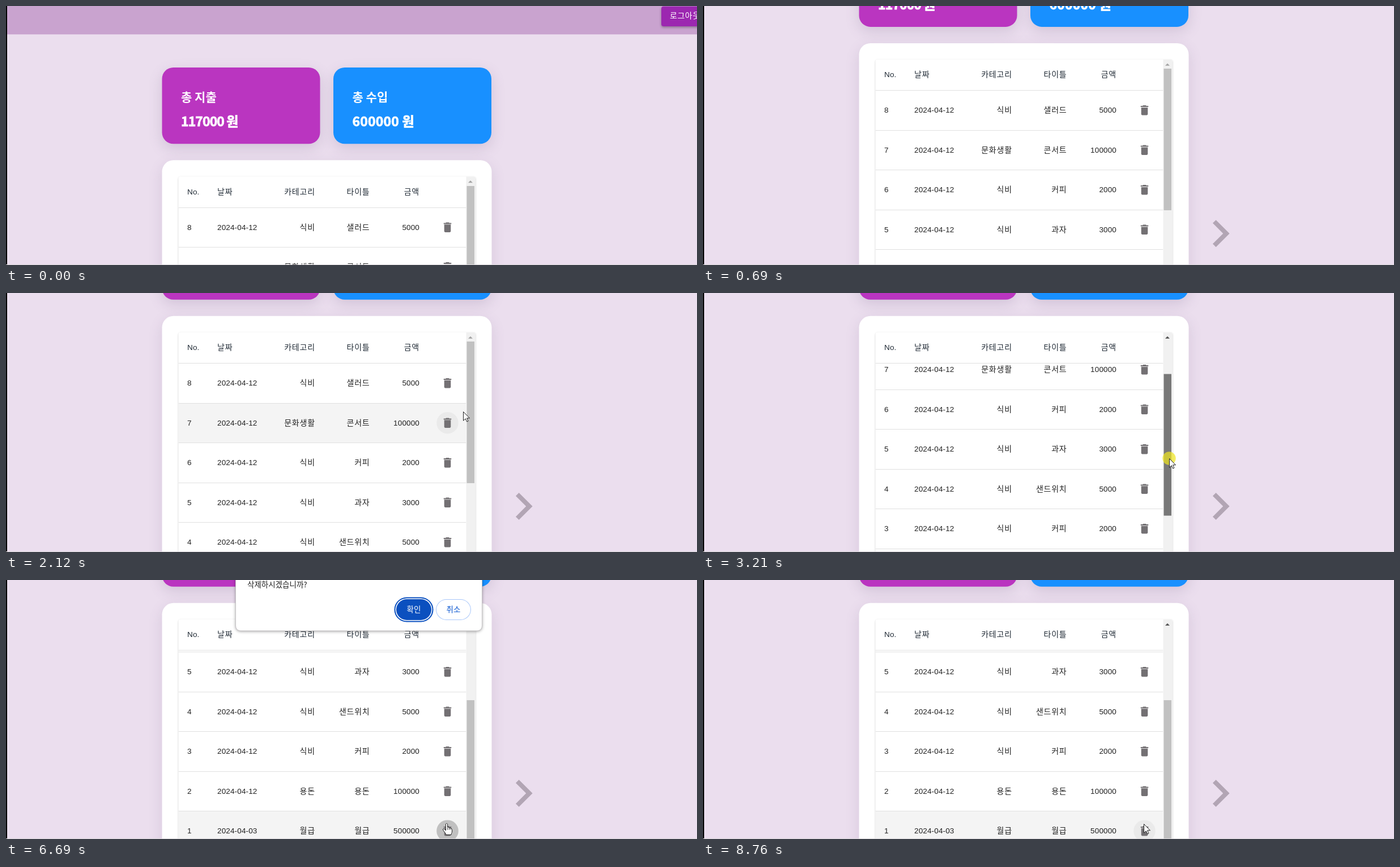
Write an HTML page with a canvas that moves like this. It is 1220 px wide and 459 px high and loops after 8970 ms.

```html
<!DOCTYPE html>
<html lang="ko">
<head>
<meta charset="utf-8">
<style>
html, body { margin: 0; width: 100%; height: 100%; overflow: hidden; background: #ebdeee; }
canvas { display: block; }
</style>
</head>
<body>
<canvas id="stage" width="1220" height="459"></canvas>
<script>
const W = 1220, H = 459, LOOP = 8970;
const ctx = document.getElementById('stage').getContext('2d');

const LATIN = "'Liberation Sans', Arial, sans-serif";
const HANGUL = "'Noto Sans CJK KR', 'Noto Sans CJK', sans-serif";
const UI = 0.966;                 // page zoom applied to icons
const ROW = 70.5, HEAD_Y = 357.2; // row pitch, bottom of the table header
const BUTTON_X = 779.5, BUTTON_R = 19.3;

const trash = new Path2D('M6 19c0 1.1.9 2 2 2h8c1.1 0 2-.9 2-2V7H6v12zM19 4h-3.5l-1-1h-5l-1 1H5v2h14V4z');
const chevron = new Path2D('M10 6L8.59 7.41 13.17 12l-4.58 4.59L10 18l6-6z');
const arrowCursor = new Path2D('M.5 .5V16.2L4.2 12.8L6.7 18L9 17L6.6 11.8H11.5Z');
const handCursor = new Path2D('M-1.6 1C-1.6-1 1.6-1 1.6 1V6.4C3 5.9 4.2 6.4 4.6 7.3C6 6.9 7 7.4 7.3 8.4C8.6 8.1 9.5 9 9.5 10.4V14C9.5 16 8 17 8 19.5H-1C-1 17.5-5 13.5-6.3 11C-7.2 9-5 8.2-3.6 9.8L-1.6 12Z');

const columns = [['No.', 320, 'left'], ['날짜', 373, 'left'], ['카테고리', 545.8, 'right'],
  ['타이틀', 642.5, 'right'], ['금액', 730, 'right']];
const rows = [
  ['8', '2024-04-12', '식비', '샐러드', '5000'],
  ['7', '2024-04-12', '문화생활', '콘서트', '100000'],
  ['6', '2024-04-12', '식비', '커피', '2000'],
  ['5', '2024-04-12', '식비', '과자', '3000'],
  ['4', '2024-04-12', '식비', '샌드위치', '5000'],
  ['3', '2024-04-12', '식비', '커피', '2000'],
  ['2', '2024-04-12', '용돈', '용돈', '100000'],
  ['1', '2024-04-03', '월급', '월급', '500000']
];

// Bursts of movement: first step, last step, number of steps.
const bursts = [[280, 690, 7], [762, 980, 4], [1390, 2120, 11], [2210, 2210, 1], [2290, 2370, 2],
  [2520, 2520, 1], [2730, 2730, 1], [2870, 3210, 6], [3280, 3700, 6], [3770, 4010, 4],
  [4360, 4660, 5], [5000, 5000, 1], [5220, 5710, 7], [6690, 6950, 4], [7990, 8130, 3], [8550, 8760, 4]];

// Cursor path: time, x, y.
const path = [[1390, 1119, 300], [1600, 960, 262], [1830, 781, 236], [1980, 779, 228], [2120, 807, 210],
  [2210, 810, 209], [2290, 813, 209], [2800, 813, 210], [3210, 823, 293], [3700, 823, 396],
  [4290, 823, 396], [4660, 778, 432]];
const scrollKeys = [[2800, 0], [3210, 94.5], [3700, 208.5]];

function hold(t) {
  let held = 0;
  for (const [a, b, n] of bursts) {
    if (t < a) break;
    const d = n > 1 ? (b - a) / (n - 1) : 1;
    held = Math.min(b, a + Math.floor((t - a) / d + 1e-6) * d);
  }
  return held;
}

function ramp(t, a, b) {
  return Math.max(0, Math.min(1, (t - a) / (b - a)));
}

function track(keys, t, k) {
  if (t <= keys[0][0]) return keys[0][k];
  for (let i = 1; i < keys.length; i++) {
    const p = keys[i - 1], q = keys[i];
    if (t <= q[0]) return p[k] + (q[k] - p[k]) * ramp(t, p[0], q[0]);
  }
  return keys[keys.length - 1][k];
}

function rect(x, y, w, h, color) {
  ctx.fillStyle = color;
  ctx.fillRect(x, y, w, h);
}

function box(x, y, w, h, r, color) {
  ctx.beginPath();
  ctx.roundRect(x, y, w, h, r);
  ctx.fillStyle = color;
  ctx.fill();
}

function disc(x, y, r, color) {
  ctx.beginPath();
  ctx.arc(x, y, r, 0, Math.PI * 2);
  ctx.fillStyle = color;
  ctx.fill();
}

function shadowed(color, blur, dy, draw) {
  ctx.save();
  ctx.shadowColor = color;
  ctx.shadowBlur = blur;
  ctx.shadowOffsetY = dy;
  draw();
  ctx.restore();
}

function icon(shape, x, y, scale, color) {
  ctx.save();
  ctx.translate(x, y);
  ctx.scale(scale, scale);
  ctx.translate(-12, -12);
  ctx.fillStyle = color;
  ctx.fill(shape);
  ctx.restore();
}

function text(str, x, y, font, color, align = 'left', spacing = 0) {
  ctx.font = font;
  ctx.fillStyle = color;
  ctx.textAlign = align;
  ctx.letterSpacing = spacing + 'px';
  ctx.fillText(str, x, y);
  ctx.letterSpacing = '0px';
}

function cell(str, col, y, color, weight) {
  const [, x, align] = columns[col];
  if (/[가-힣]/.test(str)) text(str, x, y, `${weight} 14px ${HANGUL}`, color, align, 0.77);
  else text(str, x, y, `13.5px ${LATIN}`, color, align, 0.145);
}

function summary(x, y, color, label, amount, spacing) {
  shadowed('rgba(110,90,130,.2)', 24, 8, () => box(x, y, 279, 135.3, 20, color));
  text(label, x + 33.5, y + 60, `900 21px ${HANGUL}`, '#fff');
  text(amount, x + 33.5, y + 104, `900 23px ${HANGUL}`, '#fff', 'left', spacing);
  ctx.strokeStyle = '#fff';
  ctx.lineWidth = 0.8;
  ctx.letterSpacing = spacing + 'px';
  ctx.strokeText(amount, x + 33.5, y + 104);
  ctx.letterSpacing = '0px';
}

function drawRows(page, scroll, state) {
  ctx.save();
  ctx.beginPath();
  ctx.rect(304.5, HEAD_Y - page, 508, H);
  ctx.clip();
  rows.forEach((row, i) => {
    const top = HEAD_Y - page - scroll + i * ROW;
    const mid = top + 35;
    if (i === state.row) rect(304.5, Math.floor(top) + 1, 508, 70, '#f4f4f4');
    if (i === state.button) disc(BUTTON_X, mid, BUTTON_R, 'rgba(0,0,0,.04)');
    if (i === 7 && state.ripple) {
      disc(BUTTON_X, mid, BUTTON_R * state.rippleSize, `rgba(0,0,0,${0.18 * state.ripple})`);
    }
    row.forEach((str, c) => cell(str, c, Math.round(mid + 4.5), 'rgba(0,0,0,.87)', 300));
    icon(trash, BUTTON_X, mid, UI, '#737073');
    rect(304.5, Math.floor(top + ROW), 508, 1, '#e0e0e0');
  });
  ctx.restore();
}

function drawScrollbar(top, scroll, thumbColor) {
  rect(812.5, top, 16.5, H, '#f1f1f1');
  ctx.beginPath();
  ctx.moveTo(816, top + 11);
  ctx.lineTo(820, top + 7);
  ctx.lineTo(824, top + 11);
  ctx.fillStyle = scroll > 0 ? '#505050' : '#a3a3a3';
  ctx.fill();
  rect(813.5, Math.floor(top + 17.1) + scroll * 127 / 208.5, 13.5, 251, thumbColor);
}

function drawTable(page, scroll, state) {
  const top = 302.2 - page, head = HEAD_Y - page;
  shadowed('rgba(0,0,0,.22)', 3, 1, () => box(304.5, top, 524.5, 420, 4, '#fff'));
  drawRows(page, scroll, state);
  ctx.save();
  ctx.beginPath();
  ctx.roundRect(304.5, top, 524.5, 420, 4);
  ctx.clip();
  rect(304.5, top, 508, Math.floor(head) - top, '#fff');
  rect(304.5, Math.floor(head), 508, 1, '#e0e0e0');
  columns.forEach(([label], c) => cell(label, c, Math.round(329.3 - page + 4.5), '#212b36', 400));
  drawScrollbar(top, scroll, state.thumb);
  ctx.restore();
}

function drawPage(page, scroll, state) {
  rect(0, 0, W, H, '#ebdeee');
  rect(0, -page, W, 50.3, '#c9a3cf');
  shadowed('rgba(0,0,0,.3)', 4, 2, () => box(1157, 0.7 - page, 84, 35.3, 4, '#9c27b0'));
  text('로그아웃', 1172, 22 - page, `400 14px ${HANGUL}`, '#fff', 'left', 0.5);
  summary(275.5, 109 - page, '#ba35c0', '총 지출', '117000 원', -0.9);
  summary(578, 109 - page, '#1890ff', '총 수입', '600000 원', 0.2);
  shadowed('rgba(110,90,130,.16)', 24, 8, () => box(275.5, 273.3 - page, 582, 480, 20, '#fff'));
  drawTable(page, scroll, state);
  icon(chevron, 913.6, 610.6 - page, 4, '#b2a5b4');
}

function pill(x, label, filled, color) {
  if (filled) {
    box(x - 3.5, 30.5, 69, 44, 22, color);
    box(x - 1.5, 32.5, 65, 40, 20, '#fff');
    box(x, 34, 62, 37, 18.5, color);
  } else {
    box(x, 34, 62, 37, 18.5, '#a8c7fa');
    box(x + 1, 35, 60, 35, 17.5, '#fff');
  }
  text(label, x + 31, 57, `400 13.5px ${HANGUL}`, filled ? '#fff' : color, 'center');
}

function drawDialog(alpha, message, withCancel, color) {
  if (alpha <= 0) return;
  ctx.save();
  ctx.globalAlpha = alpha;
  shadowed('rgba(0,0,0,.35)', 5, 1, () => box(405, -60, 436, 150.5, 9, '#c6c3c6'));
  box(406, -60, 434, 149.5, 8, '#fff');
  text(message, 426, 13, `400 13.5px ${HANGUL}`, '#1f1f1f');
  pill(withCancel ? 689 : 759, '확인', true, color);
  if (withCancel) pill(759, '취소', false, '#0b57d0');
  ctx.restore();
}

function drawCursor(x, y, hand) {
  ctx.save();
  ctx.translate(x, y);
  ctx.lineWidth = 1;
  ctx.lineJoin = 'round';
  ctx.fillStyle = '#fff';
  ctx.strokeStyle = '#222';
  const shape = hand ? handCursor : arrowCursor;
  ctx.fill(shape);
  ctx.stroke(shape);
  if (hand) {
    ctx.beginPath();
    for (const k of [1.6, 4.6, 7.3]) {
      ctx.moveTo(k, 7.5);
      ctx.lineTo(k, 10.5);
    }
    ctx.stroke();
  }
  ctx.restore();
}

function render(now) {
  const t = hold(now % LOOP);
  const page = t < 280 ? 0 : 232.5 * (1 - Math.pow(1 - ramp(t, 210, 980), 2.28));
  const scroll = track(scrollKeys, t, 1);
  const x = track(path, t, 1), y = track(path, t, 2);
  const shown = t >= 1390, dragging = t >= 2730 && t < 3770;

  const inBody = shown && !dragging && x >= 304 && x < 812;
  const row = inBody ? Math.floor((y - HEAD_Y + page + scroll) / ROW) : -1;
  const mid = HEAD_Y - page - scroll + row * ROW + 35;
  const reach = Math.hypot(x - BUTTON_X, y - mid);
  const onThumb = shown && x >= 812 && x <= 828;

  drawPage(page, scroll, {
    row,
    button: reach < 36 ? row : -1,
    ripple: t >= 5220 ? 1 - ramp(t, 6690, 6950) : 0,
    rippleSize: 0.4 + 0.6 * ramp(t, 5220, 5500),
    thumb: dragging ? '#787878' : onThumb ? '#a8a8a8' : '#c1c1c1'
  });

  if (shown) {
    let glow = 0;
    if (t >= 5000) glow = 1 - ramp(t, 5140, 5460);
    else if (t >= 2730) glow = 1 - ramp(t, 3700, 3930);
    if (glow > 0) disc(x, y, 11.7, `rgba(240,230,30,${0.7 * glow})`);
    const hand = row >= 0 && reach < BUTTON_R && t < 8690;
    drawCursor(x, y, hand);
  }

  drawDialog(ramp(t, 5290, 5550) * (1 - ramp(t, 6690, 6860)), '삭제하시겠습니까?', true,
    t >= 6690 ? '#0b50bf' : '#0b57d0');
  drawDialog(ramp(t, 7930, 8130) * (1 - ramp(t, 8480, 8690)), '삭제되었습니다.', false, '#0b57d0');

  rect(0, 0, 2, H, '#000');
  rect(0, 458, W, 1, '#dcd8dc');
}

const start = performance.now();
function loop() {
  render(performance.now() - start);
  requestAnimationFrame(loop);
}
loop();
</script>
</body>
</html>
```
